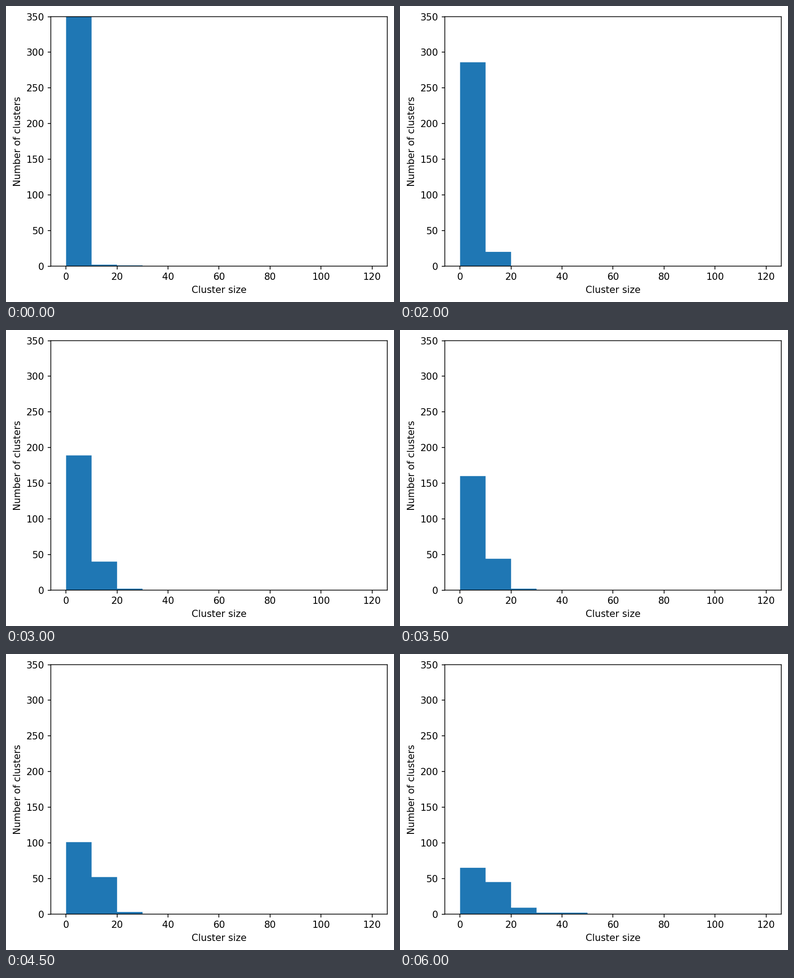
These frames come from a looping animation (855x655 px, 8000 ms). A matplotlib script:

```python
import matplotlib.pyplot as plt
import numpy as np
from matplotlib.animation import FuncAnimation

W, H, DPI = 855, 655, 150
LEFT, RIGHT, TOP, BOTTOM = 98.7, 840.2, 23.6, 575.6
BIN = 10
STEP_MS, STEPS = 500, 16

# Per size bin: (step, count) key points, joined linearly and held at the end.
KEYS = [
    [(0, 460), (3, 337), (4, 286), (5, 243), (6, 189), (9, 101), (12, 65)],
    [(0, 2), (2, 6), (4, 20), (6, 40), (9, 52), (12, 45)],
    [(0, 1), (1, 0), (5, 0), (6, 2), (8, 1), (9, 3), (12, 9)],
    [(7, 0), (8, 1), (9, 0), (11, 2)],
    [(9, 0), (10, 1), (11, 0), (12, 2)],
]


def counts(step):
    return [round(np.interp(step, *zip(*keys))) for keys in KEYS]


plt.rcParams.update({"font.family": "DejaVu Sans", "font.size": 10})

fig = plt.figure(figsize=((W + 0.01) / DPI, (H + 0.01) / DPI), dpi=DPI,
                 facecolor="white")
ax = fig.add_axes([LEFT / W, 1 - BOTTOM / H,
                   (RIGHT - LEFT) / W, (BOTTOM - TOP) / H])
edges = BIN * np.arange(len(KEYS) + 1)
hist = ax.stairs(counts(0), edges, fill=True, color="#1f77b4", linewidth=0)
ax.set_xlim(-6, 126)
ax.set_ylim(0, 350)
ax.set_xticks(range(0, 121, 20))
ax.set_yticks(range(0, 351, 50))
ax.set_xlabel("Cluster size")
ax.set_ylabel("Number of clusters")

# Keep edges at their exact subpixel positions.
for artist in (hist, *ax.spines.values()):
    artist.set_snap(False)


def update(step):
    hist.set_data(counts(step))
    return [hist]


anim = FuncAnimation(fig, update, frames=STEPS, interval=STEP_MS,
                     repeat=True, repeat_delay=0)
plt.show()
```
